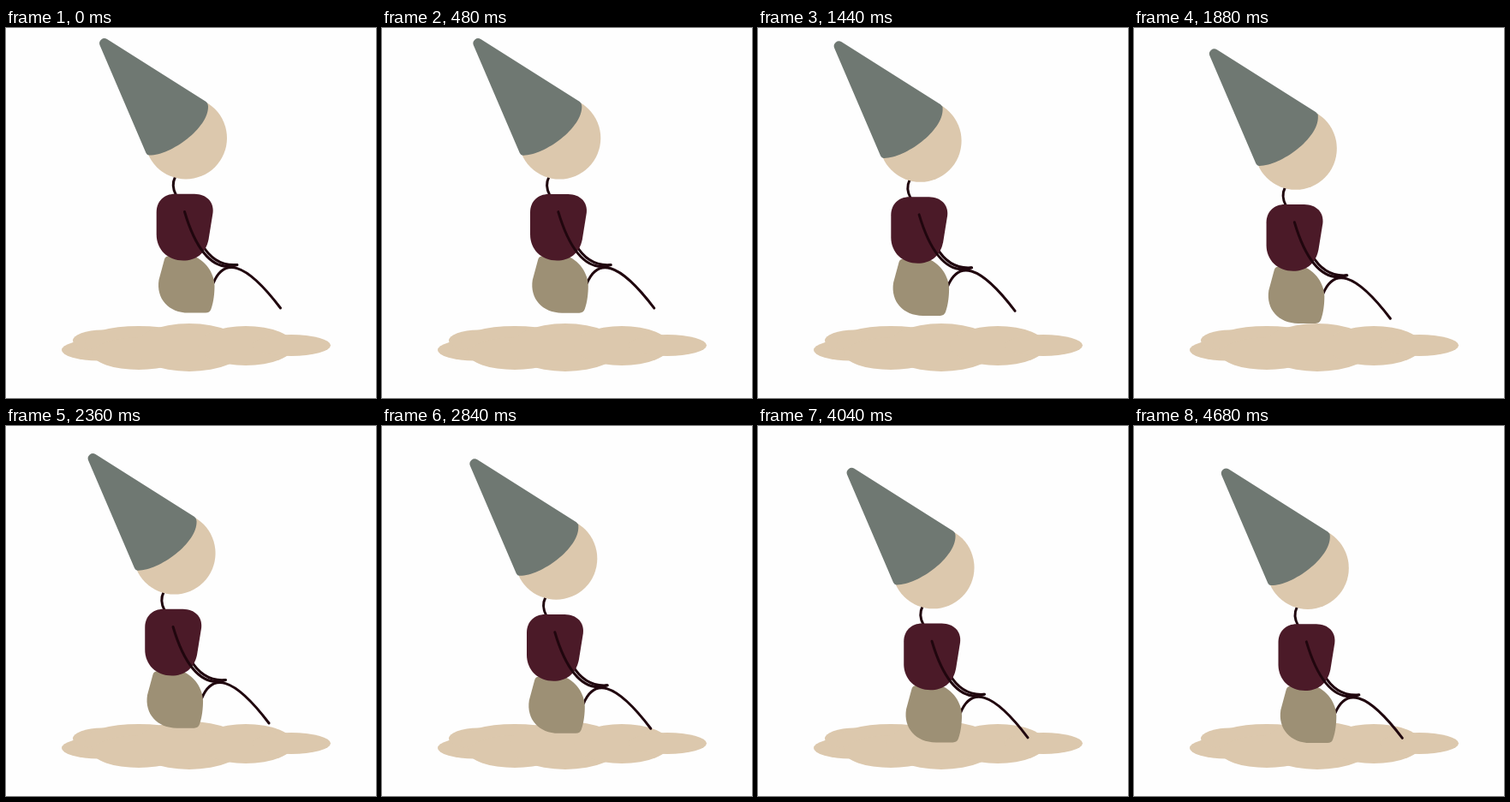
Write an HTML page that moves like this. It is 432x432 px and loops after 4.8 s.

```html
<!DOCTYPE html>
<html lang="en">
<head>
<meta charset="utf-8">
<title>Floating figure</title>
<style>
html, body { margin: 0; width: 100%; height: 100%; overflow: hidden; background: #fefefe; }
svg { display: block; width: 100%; height: 100%; }
.line { fill: none; stroke: #20060e; stroke-width: 3; stroke-linecap: round; }
</style>
</head>
<body>
<svg viewBox="0 0 432 432">
  <defs><path id="route" d="M0 0C-59.6 1.9 16.8 30.5 -7.2 37.4"/></defs>
  <g fill="#dcc8ad">
    <ellipse cx="108" cy="376" rx="43" ry="12.5"/>
    <ellipse cx="112" cy="365" rx="34" ry="12.5"/>
    <ellipse cx="155" cy="366" rx="63" ry="18"/>
    <ellipse cx="155" cy="380" rx="54" ry="19"/>
    <ellipse cx="214" cy="373" rx="65" ry="28"/>
    <ellipse cx="280" cy="371" rx="56" ry="23"/>
    <ellipse cx="333" cy="370.5" rx="46" ry="12.5"/>
  </g>
  <g id="figure">
    <path class="line" d="M242 298C254 269 278 271 320.5 327"/>
    <path fill="#9d9075" d="M192 266Q186 266 185 270L178.500 294C175 316 190 332.600 213 332.600H233Q238 332.600 239.500 328C242.500 320 243.500 309 243.500 301C243.500 288 234 270 215 265Z"/>
    <path class="line" d="M197.500 174Q192.500 184 198.500 195"/>
    <path class="line" d="M229 253C236 265 248 278 269 276.500"/>
    <path fill="#4b1a28" d="M197 193.800H220C234 194 243 203 241.500 216L236.500 247C233 264 221 271.500 207 271.500C189 271.500 175.700 259 175.700 241V215C175.700 202 185 193.800 197 193.800Z"/>
    <path class="line" d="M208.500 214.500C219 250 238 287 270 276.500"/>
    <circle cx="210" cy="128.500" r="48" fill="#dcc8ad"/>
    <path fill="#6f7872" d="M109.500 20L163.500 146Q164.800 148.800 167.500 148.600C192 149 237 117 236 91Q236.200 88 233.500 86L118 13A5.800 5.800 0 0 0 109.500 20Z"/>
  </g>
</svg>
<script>
const LOOP = 4800, STEP = 40, LAST = 4680, GLIDE = 4720;
const figure = document.getElementById('figure');
const route = document.getElementById('route');
const length = route.getTotalLength();

// Slow start, longer slow-down: cubic Bezier easing (.29, 0, .485, 1)
function ease(p) {
  let lo = 0, hi = 1, s;
  for (let i = 0; i < 24; i++) {
    s = (lo + hi) / 2;
    const v = 1 - s;
    if (3 * v * s * (v * 0.29 + s * 0.485) + s ** 3 < p) lo = s;
    else hi = s;
  }
  return s * s * (3 - 2 * s);
}

function draw(ms) {
  const t = Math.min(LAST, Math.floor(ms % LOOP / STEP) * STEP);
  const { x, y } = route.getPointAtLength(length * ease(t / GLIDE));
  figure.setAttribute('transform', `translate(${x.toFixed(2)} ${y.toFixed(2)})`);
}

let start;
function tick(now) {
  start ??= now;
  draw(Math.max(0, now - start));
  requestAnimationFrame(tick);
}
draw(0);
requestAnimationFrame(tick);
</script>
</body>
</html>
```
